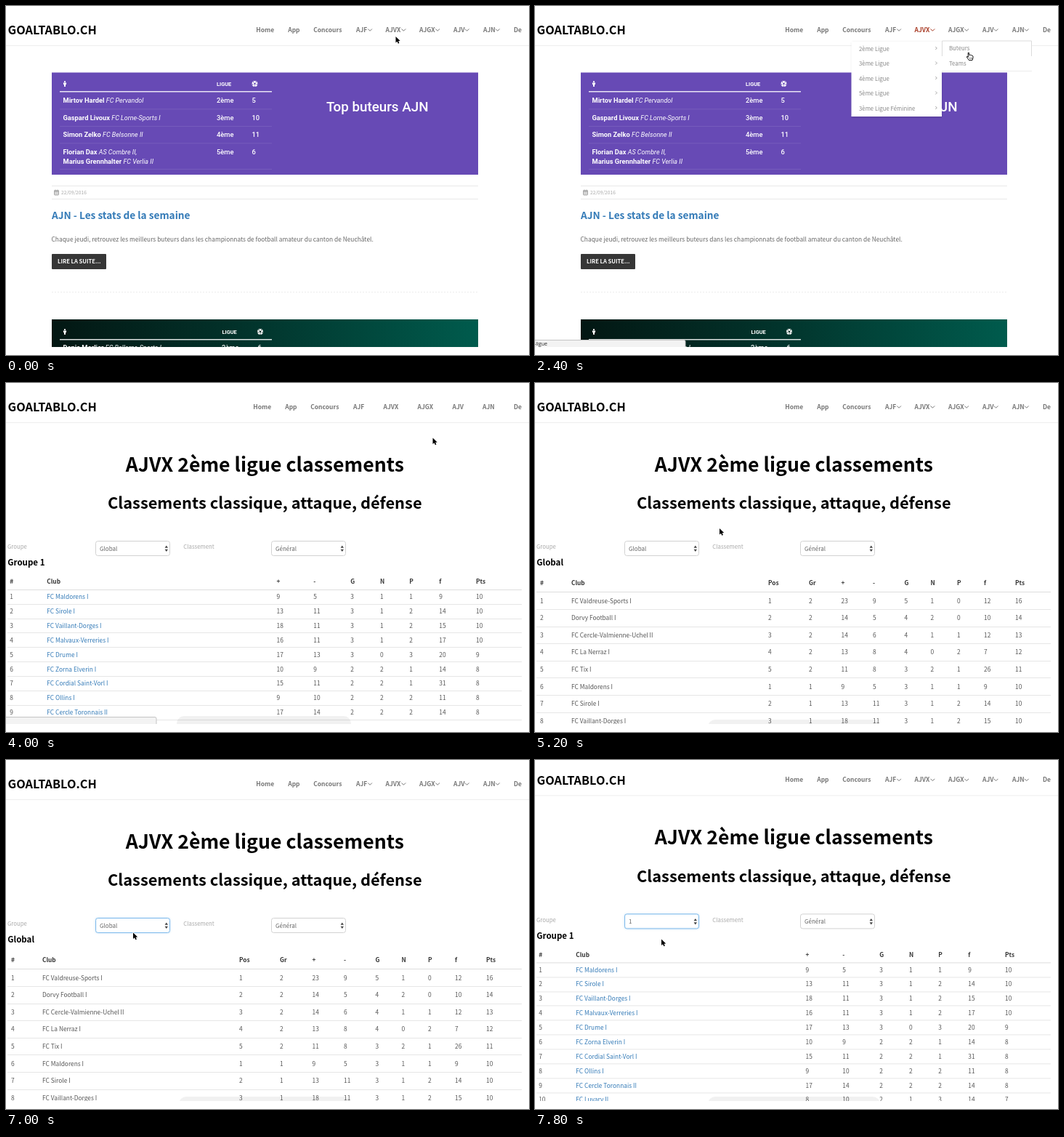
These frames come from a looping animation (720 by 480 pixels, 8000 ms). An HTML page with a canvas:

```html
<!DOCTYPE html>
<html lang="fr">
<head>
<meta charset="utf-8">
<title>Classements</title>
<style>
html, body { margin: 0; width: 100%; height: 100%; overflow: hidden; background: #fff; }
canvas { display: block; width: 720px; height: 480px; }
</style>
</head>
<body>
<canvas id="stage"></canvas>
<script>
const canvas = document.getElementById('stage');
const ctx = canvas.getContext('2d');
const scale = Math.max(1, window.devicePixelRatio || 1);
canvas.width = 720 * scale;
canvas.height = 480 * scale;

const LOOP = 8000, STEP = 200;
const SANS = '"Noto Sans CJK JP", "Noto Sans CJK SC", "Noto Sans CJK", "Open Sans", sans-serif';
const ROBOTO = 'Roboto, sans-serif';

// Draws text centred vertically on its capitals; returns its width.
function text(s, x, mid, size, color, style = '400', family = SANS, align = 'left') {
  ctx.font = `${style} ${size}px ${family}`;
  ctx.textAlign = align;
  ctx.fillStyle = color;
  ctx.fillText(s, x, mid + size * 0.36);
  return ctx.measureText(s).width;
}

function box(x, y, w, h, color) {
  ctx.fillStyle = color;
  ctx.fillRect(x, y, w, h);
}

function roundBox(x, y, w, h, r, fill, stroke) {
  ctx.beginPath();
  ctx.roundRect(x, y, w, h, r);
  if (fill) { ctx.fillStyle = fill; ctx.fill(); }
  if (stroke) { ctx.strokeStyle = stroke; ctx.lineWidth = 1; ctx.stroke(); }
}

function poly(points, color) {
  ctx.beginPath();
  points.forEach(([x, y]) => ctx.lineTo(x, y));
  ctx.closePath();
  ctx.fillStyle = color;
  ctx.fill();
}

function stroke(points, color, width = 1) {
  ctx.beginPath();
  points.forEach(([x, y], i) => i ? ctx.lineTo(x, y) : ctx.moveTo(x, y));
  ctx.strokeStyle = color;
  ctx.lineWidth = width;
  ctx.stroke();
}

function shadow(blur, color, draw, dy = 0) {
  ctx.save();
  ctx.shadowBlur = blur * scale;
  ctx.shadowColor = color;
  ctx.shadowOffsetY = dy * scale;
  draw();
  ctx.restore();
}

// label, x with carets, x without, caret x
const NAV = [
  ['Home', 344.3, 340.3], ['App', 388.2, 384.2], ['Concours', 423.2, 419.2],
  ['AJF', 482, 478, 498.3], ['AJVX', 522.5, 519.5, 544.6], ['AJGX', 569, 566.5, 591.4],
  ['AJV', 616, 614.5, 631.8], ['AJN', 657, 656, 674], ['De', 699, 699]
];

function header(carets, active) {
  text('GOALTABLO.CH', 2.5, 33.5, 16.3, '#000', '700');
  NAV.forEach(([label, x, bareX, caretX]) => {
    const color = active && label === 'AJVX' ? '#a83a24' : '#777';
    text(label, carets ? x : bareX, 33, 8.5, color, '700');
    if (carets && caretX) stroke([[caretX, 31.5], [caretX + 2.8, 34.3], [caretX + 5.6, 31.5]], color);
  });
  box(0, 54, 720, 1, '#eee');
}

function playerIcon(x, y) {
  ctx.fillStyle = '#fff';
  ctx.beginPath();
  ctx.arc(x, y - 2.8, 1.1, 0, 7);
  ctx.fill();
  poly([[x - 2.2, y - 1.4], [x + 2.2, y - 1.4], [x + 1.9, y + 1], [x + 1, y + 1.2],
        [x + 0.9, y + 4], [x - 0.9, y + 4], [x - 1, y + 1.2], [x - 1.9, y + 1]], '#fff');
}

function ballIcon(x, y, back) {
  ctx.fillStyle = '#fff';
  ctx.beginPath();
  ctx.arc(x, y, 3.9, 0, 7);
  ctx.fill();
  const ring = (r, turn) => Array.from({ length: 5 }, (_, i) => {
    const a = turn + i * Math.PI * 0.4;
    return [x + r * Math.sin(a), y - r * Math.cos(a)];
  });
  poly(ring(1.5, 0), back);
  ring(3, Math.PI / 5).forEach(([px, py]) => box(px - 0.6, py - 0.6, 1.2, 1.2, back));
}

function bannerHead(y, leagueX, ballX, back) {
  playerIcon(81, y);
  text('LIGUE', leagueX, y, 7.4, '#fff', '700', ROBOTO);
  ballIcon(ballX, y, back);
  box(74, y + 10, 292, 1.5, 'rgba(255,255,255,.85)');
}

function player(name, club, y) {
  const w = text(name + ' ', 78.5, y, 9.3, '#fff', '700', ROBOTO);
  text(club, 78.5 + w, y, 9, '#fff', 'italic 400', ROBOTO);
}

const SCORERS = [
  ['Mirtov Hardel', 'FC Pervandol', 130, '2ème', '5'],
  ['Gaspard Livoux', 'FC Lorne-Sports I', 153.5, '3ème', '10'],
  ['Simon Zelko', 'FC Belsonne II', 177, '4ème', '11'],
  ['Florian Dax', 'AS Combre II,', 200.5, '5ème', '6']
];

function homePage() {
  const purple = '#674ab5';
  box(63, 91.5, 587, 140.5, purple);
  bannerHead(107, 290, 342.5, purple);
  SCORERS.forEach(([name, club, y, league, goals], i) => {
    player(name, club, y);
    text(league, 290, y, 9.4, '#fff', '500', ROBOTO);
    text(goals, 338.5, y, 9.4, '#fff', '500', ROBOTO);
    box(74, i < 3 ? y + 11.5 : 224, 292, 0.8, 'rgba(255,255,255,.12)');
  });
  player('Marius Grennhalter', 'FC Verlia II', 213.5);
  text('Top buteurs AJN', 441, 138.5, 18.8, '#fff', '500', ROBOTO);

  box(63, 247, 587, 1, '#e9e9e9');
  box(63, 265, 587, 1, '#e9e9e9');
  roundBox(66.5, 254, 6, 6, 0.8, '#d5d5d5', '#aaa');
  box(66, 253.5, 7, 2, '#aaa');
  box(67.5, 252.5, 1, 2, '#aaa');
  box(70.5, 252.5, 1, 2, '#aaa');
  text('22/09/2016', 76, 257, 6.7, '#aaa');

  text('AJN - Les stats de la semaine', 63, 288.5, 13.65, '#337ab7', '700');
  text('Chaque jeudi, retrouvez les meilleurs buteurs dans les championnats de football amateur du canton de Neuchâtel.',
    62.5, 321, 8.4, '#666');
  roundBox(63, 341, 75, 21, 1, '#363636');
  text('LIRE LA SUITE...', 71, 351.5, 7.65, '#fff', '700');
  ctx.save();
  ctx.setLineDash([2, 2]);
  stroke([[63, 393.5], [650, 393.5]], '#ececec');
  ctx.restore();

  const green = ctx.createLinearGradient(63, 0, 650, 0);
  green.addColorStop(0, '#031713');
  green.addColorStop(0.45, '#02332b');
  green.addColorStop(1, '#005b4d');
  box(63, 431, 587, 38, green);
  bannerHead(448, 297.5, 350, '#02261f');
  player('Denis Morlier', 'FC Bellorne-Sports I', 470);
  text('2ème', 297, 470, 9.4, '#fff', '500', ROBOTO);
  text('6', 346.5, 470, 9.4, '#fff', '500', ROBOTO);
}

const LEAGUES = ['2ème Ligue', '3ème Ligue', '4ème Ligue', '5ème Ligue', '3ème Ligue Féminine'];

function navMenu(sub) {
  shadow(3, 'rgba(0,0,0,.2)', () => box(435.5, 49, 124.5, 103, '#fff'), 1);
  LEAGUES.forEach((label, i) => {
    const y = 59 + i * 20.5;
    text(label, 446, y, 7.8, '#888');
    stroke([[551.3, y - 3], [553.3, y - 1], [551.3, y + 1]], '#999', 0.9);
  });
  if (!sub) return;
  box(560, 48, 124, 42, '#fff');
  stroke([[560.5, 69], [560.5, 48], [683.5, 48], [683.5, 69]], '#dcdcdc');
  box(560, 89, 124, 1, '#ececec');
  text('Buteurs', 570, 58.5, 7.8, '#888');
  text('Teams', 570, 79, 7.8, '#888');
}

function statusBar(label) {
  roundBox(-2, 459.5, 209, 12, 2, '#f3f3f3', '#c4c4c4');
  text(label, -1, 464.5, 7, '#222', '400', '"Open Sans", sans-serif');
}

const GROUP = [
  ['FC Maldorens I', '9 5 3 1 1 9 10'],
  ['FC Sirole I', '13 11 3 1 2 14 10'],
  ['FC Vaillant-Dorges I', '18 11 3 1 2 15 10'],
  ['FC Malvaux-Verreries I', '16 11 3 1 2 17 10'],
  ['FC Drume I', '17 13 3 0 3 20 9'],
  ['FC Zorna Elverin I', '10 9 2 2 1 14 8'],
  ['FC Cordial Saint-Vorl I', '15 11 2 2 1 31 8'],
  ['FC Ollins I', '9 10 2 2 2 11 8'],
  ['FC Cercle Toronnais II', '17 14 2 2 2 14 8'],
  ['FC Luvary II', '8 10 2 1 3 14 7']
];
const TOP = [
  ['FC Valdreuse-Sports I', '23 9 5 1 0 12 16'],
  ['Dorvy Football I', '14 5 4 2 0 10 14'],
  ['FC Cercle-Valmienne-Uchel II', '14 6 4 1 1 12 13'],
  ['FC La Nerraz I', '13 8 4 0 2 7 12'],
  ['FC Tix I', '11 8 3 2 1 26 11']
];
const ranked = (rows, group) => rows.map(([club, stats], i) => [club, `${i + 1} ${group} ${stats}`]);

const TABLES = {
  group: {
    title: 'Groupe 1', heads: '# Club + - G N P f Pts', link: '#337ab7',
    cols: [5.2, 56.3, 372.5, 423.3, 474.3, 515, 555.3, 596.3, 647],
    headY: 273.5, rowY: 294.2, pitch: 19.87, rows: GROUP
  },
  global: {
    title: 'Global', heads: '# Club Pos Gr + - G N P f Pts', link: '#555',
    cols: [7, 50, 321, 377, 421.5, 465, 508.5, 544.5, 581, 618, 661],
    headY: 275.5, rowY: 299.6, pitch: 23.62, rows: [...ranked(TOP, 2), ...ranked(GROUP.slice(0, 3), 1)]
  }
};

function table({ title, heads, link, cols, headY, rowY, pitch, rows }) {
  const rule = (y, color) => box(2, Math.round(y - 0.5), 708, 1, color);
  text(title, 2.3, 247, 11.5, '#000', '700');
  heads.split(' ').forEach((h, i) => text(h, cols[i], headY, 8.3, '#333', '700'));
  rule(rowY - pitch / 2, '#ddd');
  rows.forEach(([club, stats], r) => {
    const y = rowY + r * pitch;
    [r + 1, club, ...stats.split(' ')].forEach((cell, i) =>
      text(cell, cols[i], y, 8.38, i === 1 ? link : '#555'));
    rule(y + pitch / 2, '#e6e6e6');
  });
}

function select(x, label, focus) {
  const draw = () => roundBox(x + 0.5, 217.5, 102, 20, 3, '#fff', focus ? '#85beec' : '#d2d2d2');
  if (focus) shadow(2.5, 'rgba(102,175,233,.35)', draw); else draw();
  text(label, x + 6, 228, 8, '#666');
  const ax = x + 97.8;
  poly([[ax - 2.2, 226.8], [ax, 223.6], [ax + 2.2, 226.8]], '#444');
  poly([[ax - 2.2, 228.8], [ax, 232], [ax + 2.2, 228.8]], '#444');
}

function popup(hover) {
  shadow(5, 'rgba(0,0,0,.28)', () => roundBox(116.5, 219, 103.5, 42, 3, '#f3f3f3'), 1.5);
  ['Global', '1', '2'].forEach((label, i) => {
    const y = 228 + i * 11.8;
    if (i === hover) box(116.5, y - 5.8, 103.5, 11.6, '#419df8');
    const color = i === hover ? '#fff' : '#444';
    text(label, 130, y, 8.6, color);
    if (!i) stroke([[120.3, 228], [122.2, 230.5], [125.6, 224.8]], color, 1.1);
  });
}

function rankPage(t) {
  const grouped = t < 5200 || t >= 7200;
  text('AJVX 2ème ligue classements', 356.3, 112, 26.65, '#000', '700', SANS, 'center');
  text('Classements classique, attaque, défense', 356.3, 165.5, 21.8, '#000', '700', SANS, 'center');
  text('Groupe', 2, 225.5, 7.8, '#aaa');
  text('Classement', 244.3, 225.5, 7.8, '#aaa');
  select(123, t >= 7200 ? '1' : 'Global', t >= 5400);
  select(365, 'Général', false);
  table(grouped ? TABLES.group : TABLES.global);
  if (t >= 5400 && t < 6600) popup(t < 5800 ? 0 : 1);
}

function arrow(x, y) {
  const shape = [[0, 0], [0, 8.6], [2, 6.8], [3.4, 9.8], [4.9, 9.1], [3.6, 6.2], [6.2, 6.1]];
  const at = shape.map(([px, py]) => [x + px, y + py]);
  ctx.lineJoin = 'round';
  stroke([...at, at[0]], '#fff', 1.6);
  poly(at, '#000');
}

function hand(x, y) {
  const shape = [[-0.9, 0.4], [0.4, 0.2], [0.9, 3.6], [2.3, 3.3], [3.6, 3.7], [5, 4.1], [6, 5.1],
    [6, 7.6], [5, 10.6], [0.4, 10.6], [-1.2, 8.2], [-2.8, 6], [-2, 5.2], [-0.6, 6.4]];
  const at = shape.map(([px, py]) => [x + px, y + py]);
  ctx.lineJoin = 'round';
  poly(at, '#fff');
  stroke([...at, at[0]], '#111', 1);
  [1.4, 3, 4.5].forEach(dx => stroke([[x + dx, y + 6.8], [x + dx, y + 9]], '#333', 0.6));
}

// time, x, y of the pointer
const PATH = [
  [0, 536.5, 42], [200, 536, 38], [800, 536, 37], [1200, 532, 48], [1600, 525, 57], [2000, 560, 60],
  [2400, 597, 64], [2800, 596, 66], [3200, 588, 75], [3600, 587.5, 75.5], [4400, 587.5, 75.5],
  [5000, 320, 172], [5400, 188, 228], [5800, 185, 235], [6400, 184, 237], [7000, 175, 237.5],
  [7400, 174.5, 242], [7800, 174, 246.5], [LOOP, 174, 246.5]
];

function pointer(t) {
  const i = PATH.findIndex(p => p[0] > t);
  const [t0, x0, y0] = PATH[i - 1], [t1, x1, y1] = PATH[i];
  const k = (t - t0) / (t1 - t0);
  const draw = t >= 200 && t < 3200 ? hand : arrow;
  draw(x0 + (x1 - x0) * k, y0 + (y1 - y0) * k);
}

function draw(t) {
  ctx.setTransform(scale, 0, 0, scale, 0, 0);
  box(0, 0, 720, 480, '#fff');
  ctx.save();
  ctx.beginPath();
  ctx.rect(0, 0, 720, 469);
  ctx.clip();

  const home = t < 4000;
  const menu = t >= 400 && t < 3200;
  ctx.save();
  ctx.translate(0, t >= 7800 ? -5.6 : t >= 7600 ? -2 : 0);
  header(home || t >= 4400, t >= 200 && t < 3200);
  if (home) homePage(); else rankPage(t);
  ctx.restore();

  if (menu) navMenu(t >= 1600);
  if (!home) {
    const early = t < 4400;
    roundBox(early ? 235 : 238, early ? 458 : 463, early ? 240 : 237, 30, 10, 'rgba(0,0,0,.055)');
  }
  if (t >= 400 && t < 4400) statusBar(menu ? '-ligue' : '');
  pointer(t);
  ctx.restore();
}

function tick(now) {
  draw(Math.floor((now % LOOP) / STEP) * STEP);
  requestAnimationFrame(tick);
}
draw(0);
requestAnimationFrame(tick);
</script>
</body>
</html>
```
